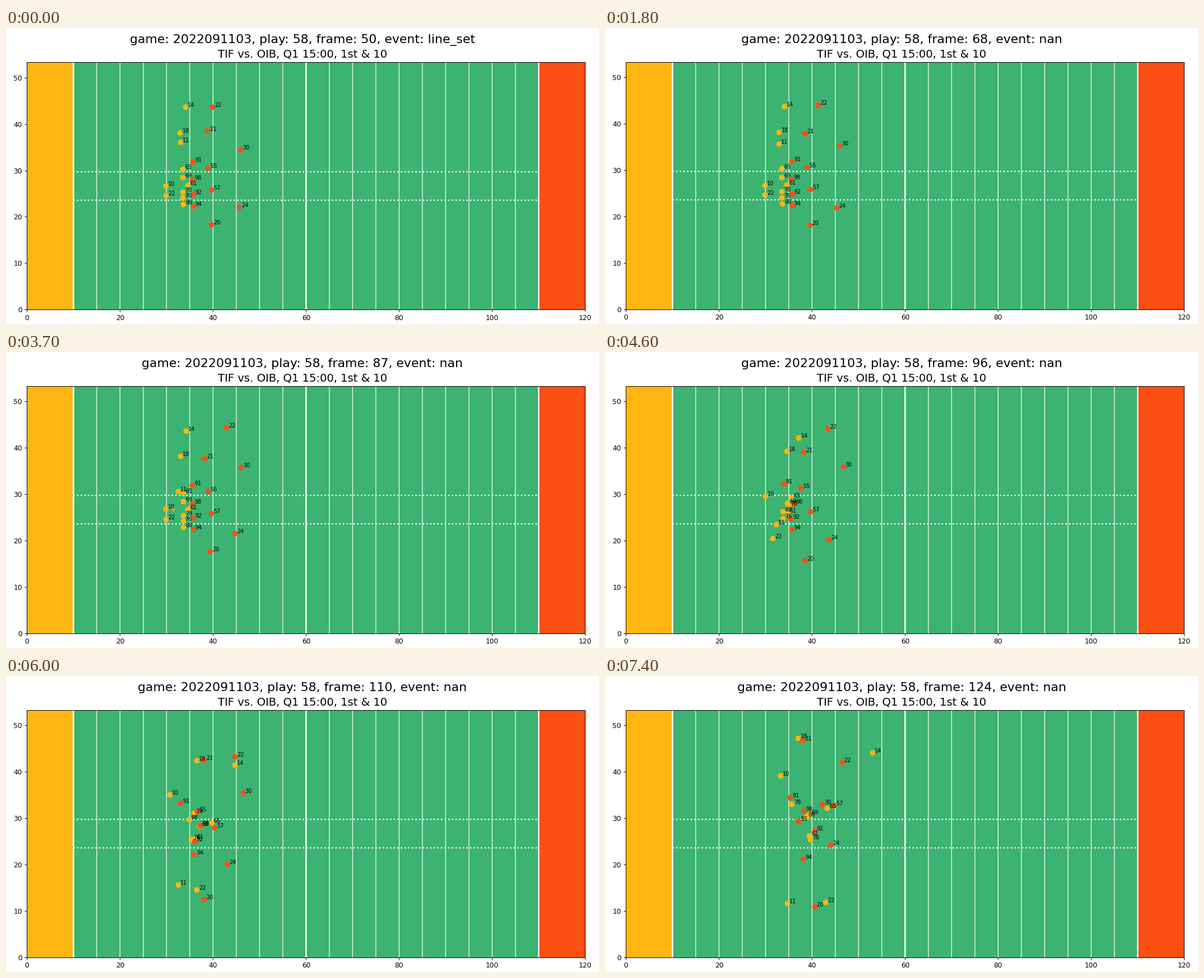
Recreate the animation shown at these times as a matplotlib script. Size 1058x529 px, loop 7500 ms.

```python
import numpy as np
import matplotlib.pyplot as plt
from matplotlib.animation import FuncAnimation

WIDTH, HEIGHT = 1058, 529
FRAMES, INTERVAL = 75, 100
FIRST_TICK = 50
HOME, AWAY, FIELD, BALL = "#FFB612", "#FB4F14", "#3CB371", "#E0B512"
SNAP, IN_HAND, THROW, CATCH, END = 34, 38.5, 53, 57, FRAMES - 1
EVENTS = {0: "line_set", 27: "man_in_motion", SNAP: "ball_snap",
          44: "play_action", THROW: "pass_forward",
          58: "pass_outcome_caught", 70: "tackle"}

plt.rcParams["font.family"] = "DejaVu Sans"
fig = plt.figure(figsize=(12, 6), dpi=WIDTH / 12)
ax = fig.add_axes([0, 0, 1, 1])
players = []


def smooth(times, points):
    """Monotone cubic path through the points, slowing down at its end."""
    times, points = np.array(times), np.array(points, float)
    gap = np.diff(times)[:, None]
    rate = np.diff(points, axis=0) / gap
    before, after = rate[:-1], rate[1:]
    same_way = before * after > 0
    total = np.where(same_way, before + after, 1)
    inner = np.where(same_way, 2 * before * after / total, 0)
    slope = np.vstack([rate[:1], inner, 0.3 * rate[-1:]])
    t = np.arange(FRAMES)
    k = np.clip(np.searchsorted(times, t, "right") - 1, 0, len(gap) - 1)
    u = (t - times[k])[:, None] / gap[k]
    return (points[k] + (points[k + 1] - points[k]) * u ** 2 * (3 - 2 * u)
            + gap[k] * u * (1 - u) * ((1 - u) * slope[k] - u * slope[k + 1]))


def player(color, number, start, middle, end, drift=(0, 0), go=SNAP + 1):
    """Drift from the start until go, then run past middle to end."""
    lined_up = np.add(start, drift)
    path = smooth([0, go, THROW + 2, END], [start, lined_up, middle, end])
    dot = ax.scatter([], [], s=50, color=color, zorder=4 if color == HOME else 5)
    label = ax.text(0, 0, str(number), fontsize=8, zorder=6)
    players.append((path, dot, label))
    return path


def draw_field():
    ax.set(xlim=(0, 120), ylim=(0, 53.3), facecolor=FIELD)
    ax.set_xticks(range(0, 121, 20))
    ax.set_yticks(range(0, 51, 10))
    ax.axvspan(0, 10, color=HOME, lw=0, zorder=0)
    ax.axvspan(110, 120, color=AWAY, lw=0, zorder=0)
    for x in range(10, 111, 5):
        ax.axvline(x, color="white", lw=2 if x in (10, 60, 110) else 1,
                   zorder=1, snap=False)
    ax.hlines([23.58, 29.72], 10, 110, color="white", ls=":", lw=2,
              zorder=1, snap=False)


def line_spot(k):
    """Five linemen, closer together to one side, the centre a yard ahead."""
    return 33.5 + (k == 2), 30.3 - 1.95 * k + 0.1 * k ** 2


draw_field()
player(HOME, 65, line_spot(0), (38.2, 28.5), (43.2, 32.1))
player(HOME, 69, line_spot(1), (36.2, 27.8), (39.4, 30.8))
player(HOME, 61, line_spot(2), (35.2, 25.4), (39.4, 26.2))
player(HOME, 78, line_spot(3), (35.9, 30.1), (35.6, 33))
player(HOME, 76, line_spot(4), (34.2, 25.4), (39.6, 25.4))
player(HOME, 14, (34, 43.7), (41.6, 41), (53, 44.1))
player(HOME, 18, (32.9, 38.2), (36.1, 40.9), (37, 47.2))
player(HOME, 11, (33, 36.1), (32.1, 17.7), (34.6, 11.7), drift=(-0.3, -0.7), go=26)
passer = player(HOME, 10, (29.8, 26.7), (30.1, 33.3), (33.2, 39.2))
player(HOME, 22, (29.8, 24.7), (34.3, 16), (42.8, 11.9))
receiver = player(HOME, 88, (33.6, 22.7), (34, 29.3), (38.7, 30.4))

player(AWAY, 22, (39.8, 43.7), (44, 43.7), (46.4, 42), drift=(2.9, 0.6))
player(AWAY, 21, (38.8, 38.5), (38.1, 41.1), (37.9, 46.8), drift=(-0.7, -0.8))
player(AWAY, 30, (45.9, 34.5), (47.2, 35.9), (42.1, 33), drift=(0, 1.3))
player(AWAY, 91, (35.6, 31.9), (32.6, 32.8), (35.3, 34.5))
player(AWAY, 55, (38.9, 30.6), (36.5, 31.8), (37.1, 29.4))
player(AWAY, 98, (35.5, 28), (36.8, 27.8), (38.2, 31.5))
player(AWAY, 57, (39.6, 25.9), (39.5, 26.8), (44.6, 32.7))
player(AWAY, 92, (35.7, 24.9), (35.1, 24.6), (40.5, 27.3))
player(AWAY, 94, (35.7, 22.4), (35.6, 22.3), (38, 21.2))
player(AWAY, 24, (45.6, 22.1), (42.8, 19.3), (43.9, 24.2), drift=(-0.8, -0.5))
player(AWAY, 20, (39.6, 18.4), (37.6, 13.3), (40.5, 10.9), drift=(-0.2, -0.6))

ball = ax.scatter([], [], s=18, color=BALL, zorder=3)
title = fig.suptitle("", fontsize=18, y=0.98)
fig.text(0.5, 0.9, "TIF vs. OIB, Q1 15:00, 1st & 10", fontsize=16, ha="center")


def ball_position(i):
    """Snap to the passer, then a throw to the receiver, who keeps it."""
    if i < THROW:
        spot = np.array(line_spot(2))
        return spot + np.interp(i, [SNAP, IN_HAND], [0, 1]) * (passer[i] - spot)
    u = np.interp(i, [THROW, CATCH], [0, 1])
    return passer[i] + u * (receiver[i] - passer[i])


def update(i):
    event = EVENTS.get(i, "nan")
    title.set_text(f"game: 2022091103, play: 58, frame: {FIRST_TICK + i}, event: {event}")
    # A title with an underscore hangs lower and pushes the field down slightly.
    bottom = 503.3 if "_" in event else 502.6
    ax.set_position([37.4 / WIDTH, 1 - bottom / HEIGHT, 996 / WIDTH, 441.9 / HEIGHT])
    for path, dot, label in players:
        x, y = path[i]
        dot.set_offsets([(x, y)])
        label.set_position((x + 0.5, y))
    ball.set_offsets([ball_position(i)])


anim = FuncAnimation(fig, update, frames=FRAMES, interval=INTERVAL,
                     init_func=lambda: update(0), repeat=True, repeat_delay=0)
plt.show()
```
